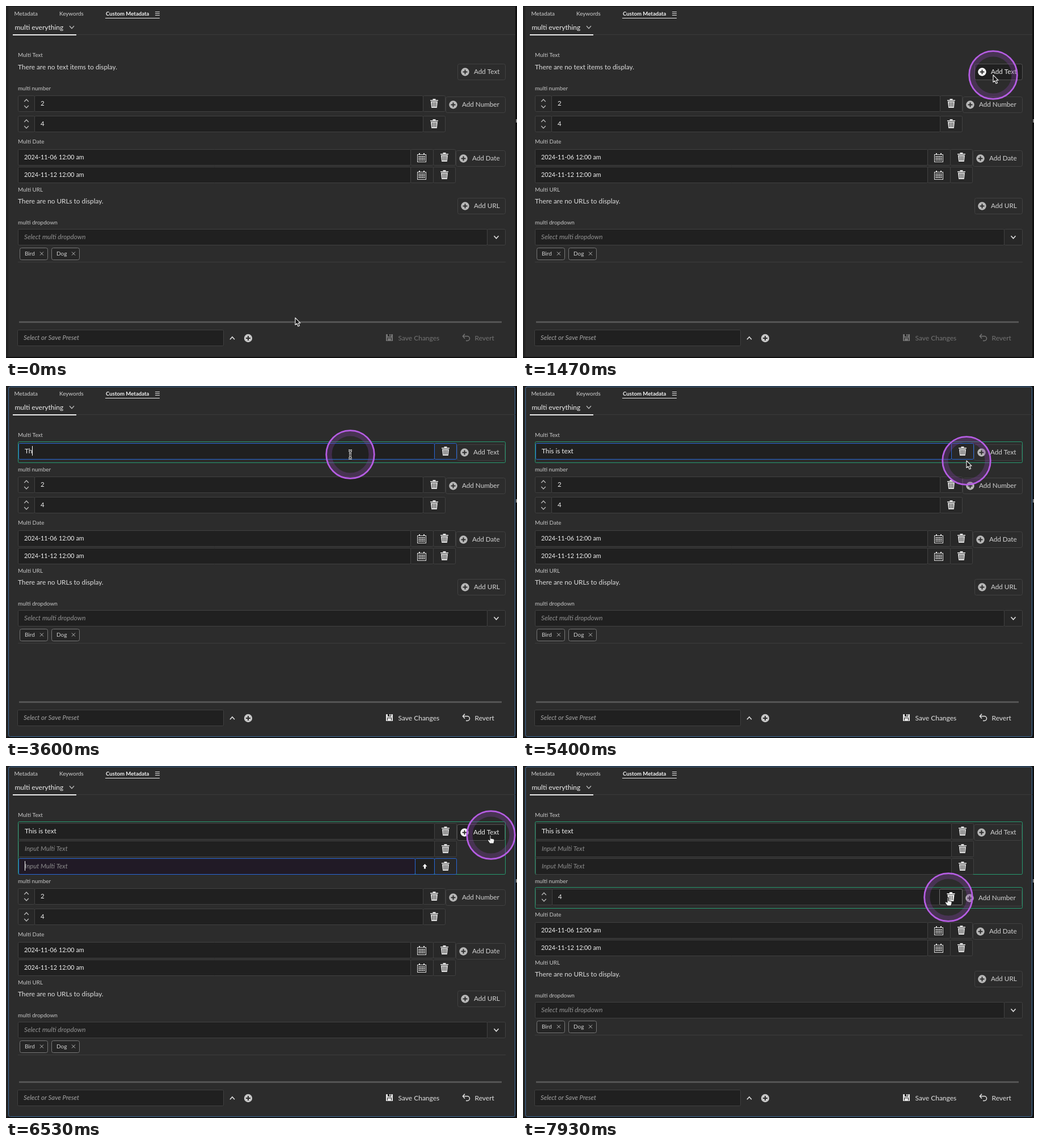
Write an HTML page with a canvas that moves like this. It is 901 px wide and 622 px high and loops after 8 s.

```html
<!DOCTYPE html>
<html>
<head>
<meta charset="utf-8">
<style>
html, body { margin: 0; width: 901px; height: 622px; overflow: hidden; background: #2c2c2c; }
canvas { display: block; }
</style>
</head>
<body>
<canvas id="stage" width="901" height="622"></canvas>
<script>
const ctx = document.getElementById('stage').getContext('2d');
const LOOP = 8000;
const PANEL = '#2c2c2c', FIELD = '#202020', EDGE = '#414141';
const GREEN = '#279b70', BLUE = '#2868d8', LIGHT = '#dedede', MUTED = '#b9b9b9';

// Timeline in ms
const ADD_ROW = [1800, 5900, 6330];
const DELETE_NUMBER = 7730;
const TYPED = 'This is text';
const KEY_TIMES = [3470, 3580, 3690, 3790, 3890, 3990, 4100, 4200, 4330, 4470, 4600, 4730];
const CARET_RESETS = [1840, ...KEY_TIMES, ...ADD_ROW.slice(1)];
const POINTER = [
  [530, 510, 551], [1330, 829, 122], [2330, 829, 122], [2410, 834, 138], [2730, 607, 121],
  [4800, 607, 121], [5200, 828, 142], [5400, 782, 132], [5750, 855, 122], [6850, 855, 122],
  [7130, 832, 204], [7270, 802, 244], [7480, 750, 232]
];

const between = (t, a, b) => t >= a && t < b;
const countPast = (times, t) => times.filter(time => time <= t).length;

function pointerAt(t) {
  const next = POINTER.findIndex(key => key[0] > t);
  if (next === 0) return POINTER[0].slice(1);
  if (next < 0) return POINTER[POINTER.length - 1].slice(1);
  const [t0, x0, y0] = POINTER[next - 1], [t1, x1, y1] = POINTER[next];
  const u = (t - t0) / (t1 - t0), e = u * u * (3 - 2 * u);
  return [x0 + (x1 - x0) * e, y0 + (y1 - y0) * e];
}

function text(str, x, y, size = 11.8, color = LIGHT, style = '') {
  ctx.font = `${style} ${size}px Lato, sans-serif`;
  ctx.fillStyle = color;
  ctx.fillText(str, x, y + size * 0.34);
}

function box(x, y, right, bottom, fill, edge = EDGE, radius = 2) {
  ctx.beginPath();
  ctx.roundRect(x + 0.5, y + 0.5, right - x - 1, bottom - y - 1, radius);
  if (fill) { ctx.fillStyle = fill; ctx.fill(); }
  ctx.strokeStyle = edge;
  ctx.lineWidth = 1;
  ctx.stroke();
}

function rect(x, y, w, h, color) {
  ctx.fillStyle = color;
  ctx.fillRect(x, y, w, h);
}

function line(points, color = LIGHT, width = 1.3) {
  ctx.beginPath();
  points.forEach(([x, y]) => ctx.lineTo(x, y));
  ctx.strokeStyle = color;
  ctx.lineWidth = width;
  ctx.stroke();
}

const chevron = (x, y, w, h, color, width) =>
  line([[x - w, y - h / 2], [x, y + h / 2], [x + w, y - h / 2]], color, width);

function plus(x, y, color = MUTED) {
  ctx.beginPath();
  ctx.arc(x, y, 7.2, 0, 7);
  ctx.fillStyle = color;
  ctx.fill();
  rect(x - 4, y - 1, 8, 2, PANEL);
  rect(x - 1, y - 4, 2, 8, PANEL);
}

function trash(x, y, color = LIGHT) {
  rect(x - 7, y - 6, 14, 1.6, color);
  rect(x - 2.5, y - 8, 5, 2, color);
  ctx.beginPath();
  [[-6, -3.5], [6, -3.5], [4.8, 8], [-4.8, 8]].forEach(([dx, dy]) => ctx.lineTo(x + dx, y + dy));
  ctx.fill();
  for (const dx of [-2.8, 0, 2.8]) rect(x + dx - 0.5, y - 2, 1, 8, FIELD);
}

function calendar(x, y) {
  ctx.strokeStyle = LIGHT;
  ctx.lineWidth = 1;
  ctx.strokeRect(x - 7.5, y - 5.5, 15, 13);
  rect(x - 5, y - 8, 2, 3, LIGHT);
  rect(x + 3, y - 8, 2, 3, LIGHT);
  for (let i = 0; i < 12; i++) rect(x - 5.5 + i % 4 * 3, y - 3 + (i >> 2) * 3, 2, 2, LIGHT);
}

function trashButton(x, y, right, { edge = EDGE, hover = false } = {}) {
  box(x, y, right, y + 29, hover ? '#1e1e1e' : '#282828', hover ? '#707070' : edge);
  trash((x + right) / 2, y + 14, hover ? '#fff' : LIGHT);
}

function addButton(label, x, y, right, iconX, hover) {
  box(x, y, right, y + 29, hover ? '#202020' : PANEL, hover ? '#525252' : EDGE, 3);
  plus(iconX, y + 14.5, hover ? '#fff' : MUTED);
  text(label, iconX + 15.5, y + 14.5, 11.7, hover ? '#efefef' : '#d2d2d2');
}

function header(active) {
  rect(0, 0, 901, 622, PANEL);
  rect(0, 0, 4, 622, '#232323');
  rect(0, 0, 901, 1, '#161616');
  rect(898, 0, 3, 622, '#101010');
  rect(0, 620, 901, 2, '#101010');
  rect(899, 200, 2, 6, '#888');
  if (active) box(4, 1, 898, 620, null, '#42709f', 3);
  text('Metadata', 14.5, 14, 9.9, '#d0d0d0');
  text('Keywords', 94, 14, 9.9, '#d0d0d0');
  text('Custom Metadata', 176, 14, 9.6, '#f4f4f4', 'bold');
  for (const y of [10, 13, 16]) rect(263, y, 8, 1, LIGHT);
  rect(175, 21, 96, 1, '#e8e8e8');
  text('multi everything', 15.5, 38, 12, '#f0f0f0');
  chevron(116, 37.5, 4, 4.5, MUTED);
  rect(12, 50, 886, 1, '#3b3b3b');
  rect(12, 50, 112, 2, '#ededed');
}

function textSection(t, rows) {
  text('Multi Text', 21, 86.5, 9.9, '#c8c8c8');
  const hover = between(t, 1400, 2400) || between(t, 5620, 6950);
  if (!rows) {
    text('There are no text items to display.', 21, 108);
    addButton('Add Text', 796, 102, 881, 809.5, hover);
    return;
  }
  box(21, 98, 881, [136, 161, 192][rows - 1], null, GREEN);
  addButton('Add Text', 795, 103, 880, 808.5, hover);
  for (let i = 0; i < rows; i++) {
    const y = 101 + 31 * i;
    const focused = i === rows - 1 && t < DELETE_NUMBER;
    const edge = focused ? BLUE : EDGE;
    const movable = focused && i > 0;
    const value = i ? '' : TYPED.slice(0, countPast(KEY_TIMES, t));
    box(22, y, movable ? 722 : 756, y + 29, movable ? '#211a26' : FIELD, edge);
    if (value) text(value, 33, y + 14, 11.8, '#f0f0f0');
    else text('Input Multi Text', 33, y + 14.5, 11.5, '#8b8b8b', 'italic');
    if (movable) {
      box(721, y, 756, y + 29, FIELD, edge);
      line([[738.5, y + 18.5], [738.5, y + 13]], '#fff', 3);
      ctx.beginPath();
      [[734.5, 14.5], [738.5, 10], [742.5, 14.5]].forEach(([x, dy]) => ctx.lineTo(x, y + dy));
      ctx.fillStyle = '#fff';
      ctx.fill();
    }
    trashButton(755, y, 795, { edge });
    if (focused) {
      const reset = CARET_RESETS.filter(time => time <= t).pop();
      if (reset && Math.floor((t - reset) / 500) % 2 === 0) {
        ctx.font = '11.8px Lato, sans-serif';
        rect(33 + Math.round(ctx.measureText(value).width), y + 5, 1, 17, '#fff');
      }
    }
  }
}

function numberRow(value, x, y, right, hover) {
  box(x, y, x + 30, y + 29, '#272727');
  chevron(x + 15, y + 9, 3.8, -4, MUTED);
  chevron(x + 15, y + 20, 3.8, 4, MUTED);
  box(x + 29, y, right, y + 29, FIELD);
  text(value, x + 40, y + 14.5, 11.5, '#f0f0f0');
  trashButton(right - 1, y, 775, { hover });
}

function numberSection(t, dy) {
  text('multi number', 21, 145.5 + dy, 9.9, '#c8c8c8');
  const hoverAdd = between(t, 7150, 7390), hoverTrash = t >= 7400;
  if (t >= DELETE_NUMBER) {
    box(21, 214, 881, 252, null, GREEN);
    addButton('Add Number', 774, 219, 880, 787.5, false);
    numberRow('4', 22, 217, 735, hoverTrash);
  } else {
    addButton('Add Number', 775, 160 + dy, 881, 788.5, hoverAdd);
    numberRow('2', 21, 158 + dy, 736, hoverTrash);
    numberRow('4', 21, 194 + dy, 736, false);
  }
}

function tag(label, x, right) {
  box(x, 427, right, 449, '#252525', '#787878', 3);
  text(label, x + 9, 438, 10, '#d0d0d0');
  line([[right - 14, 434.5], [right - 8, 440.5]], MUTED, 1);
  line([[right - 8, 434.5], [right - 14, 440.5]], MUTED, 1);
}

function lowerSections(dy) {
  ctx.save();
  ctx.translate(0, dy);
  text('Multi Date', 21, 240, 9.9, '#c8c8c8');
  ['2024-11-06 12:00 am', '2024-11-12 12:00 am'].forEach((date, i) => {
    const y = 253 + 31 * i;
    box(21, y, 714, y + 29, FIELD);
    text(date, 32, y + 14.5, 10.8, '#f0f0f0');
    box(713, y, 754, y + 29, '#272727');
    calendar(733, y + 15);
    trashButton(753, y, 793);
  });
  addButton('Add Date', 793, 255, 881, 806.5, false);
  text('Multi URL', 21, 324.5, 9.9, '#c8c8c8');
  text('There are no URLs to display.', 21, 345);
  addButton('Add URL', 796, 339, 881, 809.5, false);
  text('multi dropdown', 21, 382.5, 10, '#c8c8c8');
  box(21, 394, 849, 423, FIELD);
  text('Select multi dropdown', 32, 408.5, 11.7, '#929292', 'italic');
  box(848, 394, 881, 423, '#272727');
  chevron(864.5, 408.5, 4, 4.5, LIGHT, 1.7);
  tag('Bird', 24, 74);
  tag('Dog', 80, 130);
  rect(21, 452, 860, 1, '#3d3d3d');
  ctx.restore();
}

function footer(enabled) {
  const color = enabled ? '#e4e4e4' : '#747474';
  rect(23, 557, 851, 3, '#545454');
  box(20, 572, 384, 601, FIELD);
  text('Select or Save Preset', 31, 586.5, 11.4, '#a4a4a4', 'italic');
  chevron(399, 587, 4, -4.5, LIGHT, 1.6);
  plus(427, 587, '#c8c8c8');
  rect(670, 580, 12, 12, color);
  rect(673, 580, 6, 4, PANEL);
  rect(676, 580, 2, 3, color);
  rect(672, 586, 8, 5, PANEL);
  rect(673, 587, 6, 4, color);
  text('Save Changes', 691.5, 586.5, 12, color);
  line([[809, 579.5], [805.5, 583.5], [809, 587.5]], color, 1.5);
  ctx.beginPath();
  ctx.moveTo(806, 583.5);
  ctx.lineTo(813.5, 583.5);
  ctx.arc(813.5, 587.5, 4, -Math.PI / 2, Math.PI / 2);
  ctx.lineTo(811, 591.5);
  ctx.stroke();
  text('Revert', 826.5, 586.5, 12, color);
}

const ARROW = new Path2D('M0 0V12.5L3 10L5 15L7.5 14L5.4 9.2H9Z');
const HAND = new Path2D('M-2 1Q-1-1 0 1V6L5 7Q7 8 6 11L5 15H-2L-6 9Q-5 7-2 9Z');
const IBEAM = new Path2D('M-3-7Q0-7 0-5Q0-7 3-7M0-5V5M-3 7Q0 7 0 5Q0 7 3 7M-2 1H2');

function pointer(t) {
  const [x, y] = pointerAt(t);
  ctx.save();
  ctx.translate(x, y);
  ctx.globalAlpha = Math.min(1, Math.max(0, (t - 900) / 250));
  ctx.beginPath();
  ctx.arc(0, 0, 37, 0, 7);
  ctx.strokeStyle = 'rgba(126, 65, 158, .34)';
  ctx.lineWidth = 9;
  ctx.stroke();
  ctx.beginPath();
  ctx.arc(0, 0, 42.3, 0, 7);
  ctx.strokeStyle = '#b65de3';
  ctx.lineWidth = 2.8;
  ctx.stroke();
  ctx.globalAlpha = 1;
  ctx.lineJoin = 'round';
  if (between(t, 2500, 5000)) {
    for (const [color, width] of [['#eee', 3.4], ['#181818', 1.2]]) {
      ctx.strokeStyle = color;
      ctx.lineWidth = width;
      ctx.stroke(IBEAM);
    }
  } else {
    const hand = between(t, 1730, 2500) || t >= 5620;
    const shape = hand ? HAND : ARROW;
    ctx.strokeStyle = hand ? '#222' : '#e8e8e8';
    ctx.fillStyle = hand ? '#f2f2f2' : '#181818';
    ctx.lineWidth = 1.2;
    ctx.fill(shape);
    ctx.stroke(shape);
  }
  ctx.restore();
}

function draw(t) {
  const rows = countPast(ADD_ROW, t);
  const dy = [0, 2, 27, 58][rows];
  header(rows > 0);
  textSection(t, rows);
  numberSection(t, dy);
  lowerSections(t >= DELETE_NUMBER ? 23 : dy);
  footer(rows > 0);
  pointer(t);
}

function frame() {
  draw(performance.now() % LOOP);
  requestAnimationFrame(frame);
}
frame();
</script>
</body>
</html>
```
